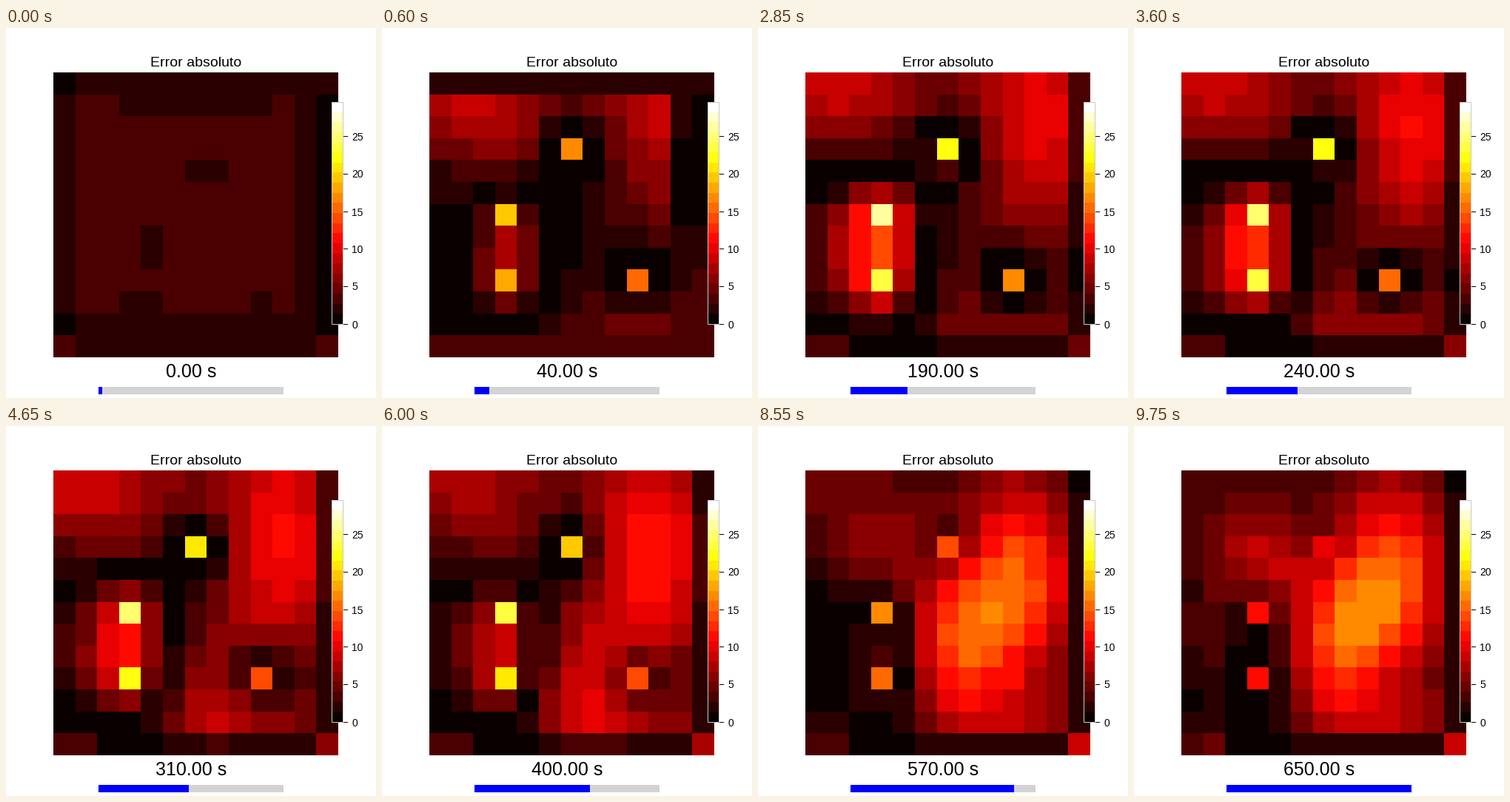
Write a matplotlib script that moves like this. It is 500 px wide and 500 px high and loops after 9.9 s.

```python
import numpy as np
import matplotlib.pyplot as plt
from matplotlib.animation import FuncAnimation
from matplotlib.patches import Rectangle

STEPS, STEP_MS, STEP_S = 66, 150, 10
END_S = (STEPS - 1) * STEP_S
N = 13
LEVELS = 22
TOP_VALUE = 29.55
# heat sources: row, column, peak level, mid-run dip
SPOTS = [(3, 6, 17, 0), (6, 3, 20, 0), (9, 3, 19, 1), (9, 9, 16, 4)]

plt.rcParams["font.family"] = "Liberation Sans"
row, col = np.mgrid[0:N, 0:N]


def blob(y, x, sy, sx, height=0):
    """Gaussian bump, stretched downwards by height cells."""
    dy = row - np.clip(row, y, y + height)
    return np.exp(-((dy / sy) ** 2 + ((col - x) / sx) ** 2) / 2)


def through(t, *points):
    """Value at t on a line through (time, value) points."""
    return np.interp(t, *zip(*points))


def start_field():
    """Nearly even error with a weaker rim and a few weak patches."""
    v = np.full((N, N), -2.5)
    v[[0, 11, 12]] = v[:, [0, 11]] = -1.5
    v[1:12, 12] = v[[0, 11], 0] = -0.5
    v[12, [0, 12]] = -2.5
    v[1, 3:10] = v[4, 6:8] = v[7:9, 4] = v[10, 3:5] = v[10, 9] = -1.5
    return v


def model(t):
    """Signed error in colour levels once the sources are on."""
    u = t / END_S
    ramp = np.clip((t - 60) / 480, 0.15, 1)

    # broad negative regions that drift and grow
    v = -(6.3 + 4.2 * u) * blob(min(4.5, 5.4 * u), 10.6 - 1.4 * u,
                                5 - 1.4 * u, 2.4 - 0.5 * u)
    v -= 8.5 * ramp * blob(11 - 3.4 * ramp ** 3, 6.4, 3, 1.8)
    v -= through(t, (40, 6.3), (310, 6.8), (650, 2)) * blob(0, 1, 2.3, 3.5)
    v -= through(t, (40, 2), (120, 0), (490, 1.5), (650, 5)) \
        * blob(3.5, 3, 1.8, 1.8)
    v -= 3 * blob(11, 10, 1.3, 2.5)
    v += through(t, (40, -1), (190, 3.5), (490, 1.5), (650, -2.5)) \
        * blob(7.5, 1, 2, 1.5)

    # the outer rim is damped, and lags behind at first
    v[12] *= 0.4
    v[:, 12] *= 0.45
    settled = np.clip((t - 30) / 90, 0, 1)
    rim = np.where(row == 12, 2.5, np.clip((row - 6) * 0.8 + 0.4, 0.4, 2.4))
    rim[0] = 1.2
    on_rim = (row == 0) | (row == 12) | (col >= 11)
    v = np.where(on_rim, v * settled - rim * (1 - settled), v)
    v -= 3.5 * settled * blob(12, 0.6, 0.8, 0.7)
    v -= 6 * ramp ** 0.5 * settled * blob(12, 12, 0.4, 0.4)

    # glow around the sources, then the sources themselves
    power = (1 - np.exp(-t / 60)) * (1 - 0.8 * u)
    v += power * (9 * blob(3, 6, 1, 1) + 13 * blob(6, 3, 1, 1.1, height=3)
                  + 8 * blob(9, 9, 1, 1))
    heat_up = through(t, (40, 0.72), (120, 1), (310, 0.88), (490, 0.78),
                      (650, 0.4))
    for r, c, peak, dip in SPOTS:
        v[r, c] = peak * heat_up - dip * np.sin(np.pi * u) + 0.5
    return v


def levels_at(t):
    """Absolute error at t seconds as whole colour levels."""
    k = min(t / 40, 1)
    v = start_field() * (1 - k) + model(t) * k
    return np.clip(np.floor(np.abs(v)), 0, LEVELS - 1)


fig = plt.figure(figsize=(5, 5), dpi=100, facecolor="white")
ax = fig.add_axes([0, 0, 1, 1])
ax.axis("off")


def box(x, y, w, h, color, z=1):
    return ax.add_patch(Rectangle((x, y), w, h, color=color, lw=0, zorder=z))


look = dict(cmap=plt.get_cmap("hot", LEVELS), vmin=-0.5, vmax=LEVELS - 0.5,
            interpolation="nearest", aspect="auto")
heat = ax.imshow(levels_at(0), extent=(64, 449, 445, 60), zorder=1, **look)

# colour bar
ax.imshow(np.arange(LEVELS)[::-1, None], extent=(440, 455, 400, 100),
          zorder=2, **look)
ax.add_patch(Rectangle((440.5, 100.5), 15, 300, fill=False, ec="#c8c8c8",
                       lw=0.72, snap=False, zorder=3))
for value in range(0, 30, 5):
    y = round(400 - 300 * value / TOP_VALUE)
    box(456, y, 6, 1, "black", 3)
    ax.text(467, y, str(value), size=10, va="center_baseline", zorder=3)

ax.text(256.5, 52, "Error absoluto", size=14, ha="center", va="baseline")
clock = ax.text(250, 472, "", size=18, ha="center", va="baseline")

# progress bar
box(125, 485, 250, 10, "lightgray")
progress = box(125, 485, 5, 10, "blue", 2)

ax.set_xlim(0, 500)
ax.set_ylim(500, 0)


def update(i):
    t = i * STEP_S
    heat.set_data(levels_at(t))
    clock.set_text(f"{t:.2f} s")
    progress.set_width(min(250, round(250 * (i + 1) / STEPS) + 1))
    return heat, clock, progress


anim = FuncAnimation(fig, update, frames=STEPS, interval=STEP_MS,
                     repeat=True, repeat_delay=0)
plt.show()
```
